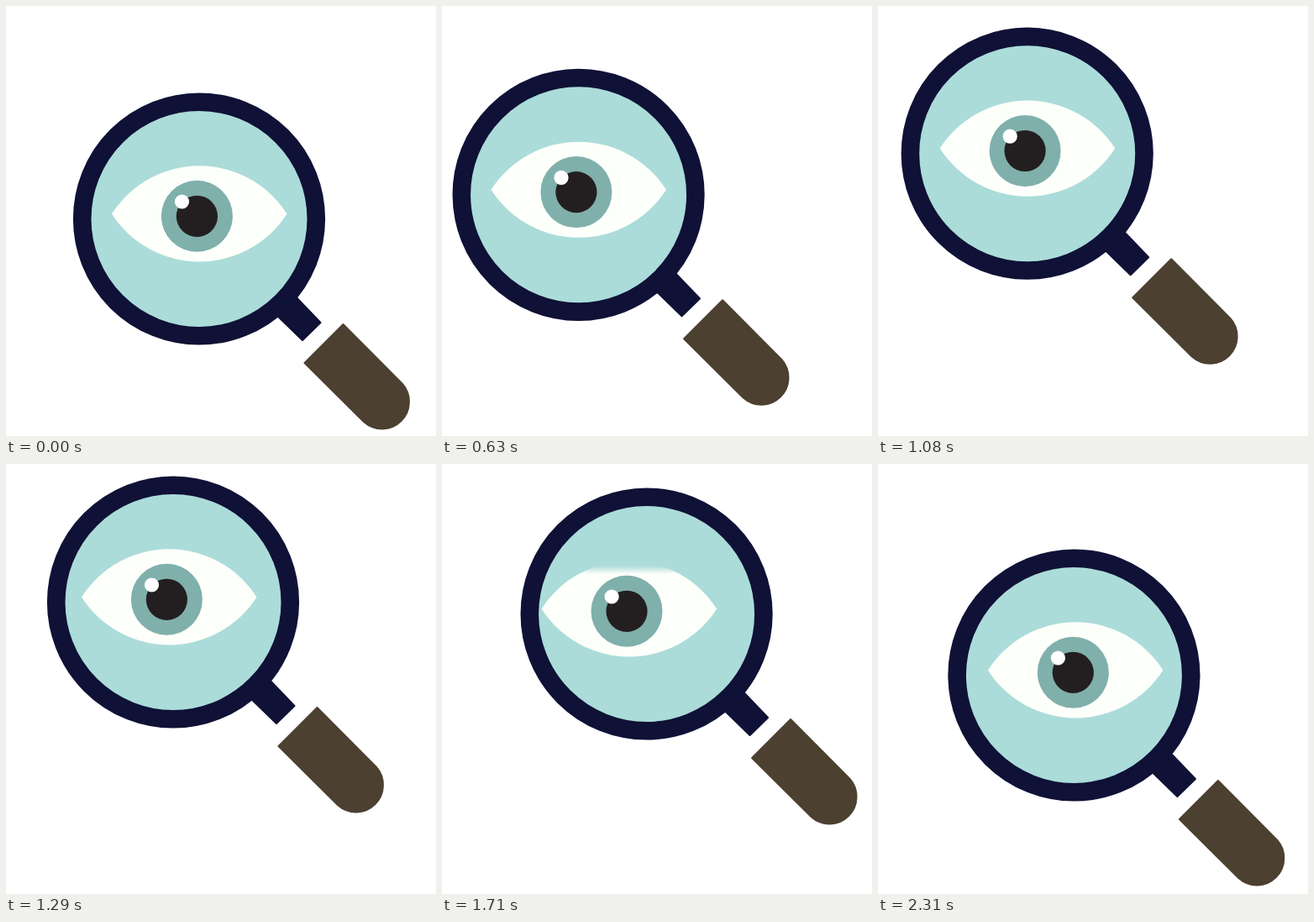
Write an HTML page that moves like this. It is 512 px wide and 512 px high and loops after 2340 ms.

```html
<!DOCTYPE html>
<html lang="en">
<head>
<meta charset="utf-8">
<title>Searching eye</title>
<style>
html, body { margin: 0; width: 100%; height: 100%; overflow: hidden; background: #fff; }
svg { display: block; width: 100vw; height: 100vh; }
</style>
</head>
<body>
<svg viewBox="0 0 512 512">
  <defs>
    <linearGradient id="soft" x1="0" y1="0" x2="0" y2="1">
      <stop offset="0.74" stop-color="#abdcd9"/>
      <stop offset="1" stop-color="#abdcd9" stop-opacity="0"/>
    </linearGradient>
  </defs>
  <g id="glass">
    <path d="M340 341L374.5 377L353 398L317 363Z" fill="#0f1136" stroke="#0f1136" stroke-width="2" stroke-linejoin="round"/>
    <path d="M401.5 379L471.8 449.7A32.3 32.3 0 0 1 426.2 495.3L355.5 425Z" fill="#4c4030" stroke="#4c4030" stroke-width="2" stroke-linejoin="round"/>
    <circle cx="230" cy="253.5" r="139.3" fill="#abdcd9" stroke="#0f1136" stroke-width="21.6"/>
    <g id="eye">
      <path d="M126 247.4A123.8 123.8 0 0 1 334.5 247.4A123.8 123.8 0 0 1 126 247.4Z" fill="#fdfffb"/>
      <rect id="lid" x="165" y="168" width="130" height="38" fill="url(#soft)"/>
      <circle cx="227.4" cy="250.3" r="42.5" fill="#80b0ab"/>
      <circle cx="227.4" cy="250.3" r="24.6" fill="#231f20"/>
      <circle cx="209.5" cy="233" r="8.6" fill="#fff"/>
    </g>
  </g>
</svg>
<script>
const LOOP = 2340, STEP = 30;
const byId = id => document.getElementById(id);
const glass = byId('glass'), eye = byId('eye'), lid = byId('lid');

// [time, x, y] of the lens centre
const path = [
  [0, 230, 253.5], [165, 209.5, 258], [330, 188, 253.5], [540, 167, 235.5],
  [720, 161, 213.5], [900, 165, 193.5], [1080, 177.7, 175.7], [1290, 199, 164.5],
  [1455, 218, 165.2], [1620, 235.7, 172.5], [1710, 243.6, 178.5],
  [1980, 253, 212], [2160, 247, 235.7], [2310, 233.4, 251.5]
];
// [time, sideways shift of the eye inside the lens]
const gaze = [
  [0, 0], [900, 0], [1080, 0], [1290, -5], [1710, -21],
  [1980, -26.7], [2140, -13], [2310, 1.5]
];

// Smooth periodic curve through the keys
function curve(keys, col, t) {
  const n = keys.length;
  const at = i => {
    const turn = Math.floor(i / n), k = keys[i - turn * n];
    return [k[0] + turn * LOOP, k[col]];
  };
  let i = n - 1;
  while (keys[i][0] > t) i--;
  const [a, b, c, d] = [i - 1, i, i + 1, i + 2].map(at);
  const h = c[0] - b[0], u = (t - b[0]) / h, v = 1 - u;
  const m0 = (c[1] - a[1]) / (c[0] - a[0]) * h;
  const m1 = (d[1] - b[1]) / (d[0] - b[0]) * h;
  return b[1] * (1 + 2 * u) * v * v + m0 * u * v * v
       + c[1] * u * u * (3 - 2 * u) - m1 * u * u * v;
}

const move = (el, x, y) => el.setAttribute('transform', `translate(${x.toFixed(2)} ${y.toFixed(2)})`);

function draw(t) {
  move(glass, curve(path, 1, t) - 230, curve(path, 2, t) - 253.5);
  move(eye, curve(gaze, 1, t), 0);
  const near = Math.max(0, 1 - Math.abs(t - 1710) / 180);
  const squint = near * near * (3 - 2 * near);
  move(lid, 0, -17 * (1 - squint));
}

const start = performance.now();
function tick() {
  const t = (performance.now() - start) % LOOP;
  draw(Math.floor(t / STEP) * STEP);
  requestAnimationFrame(tick);
}
tick();
</script>
</body>
</html>
```
